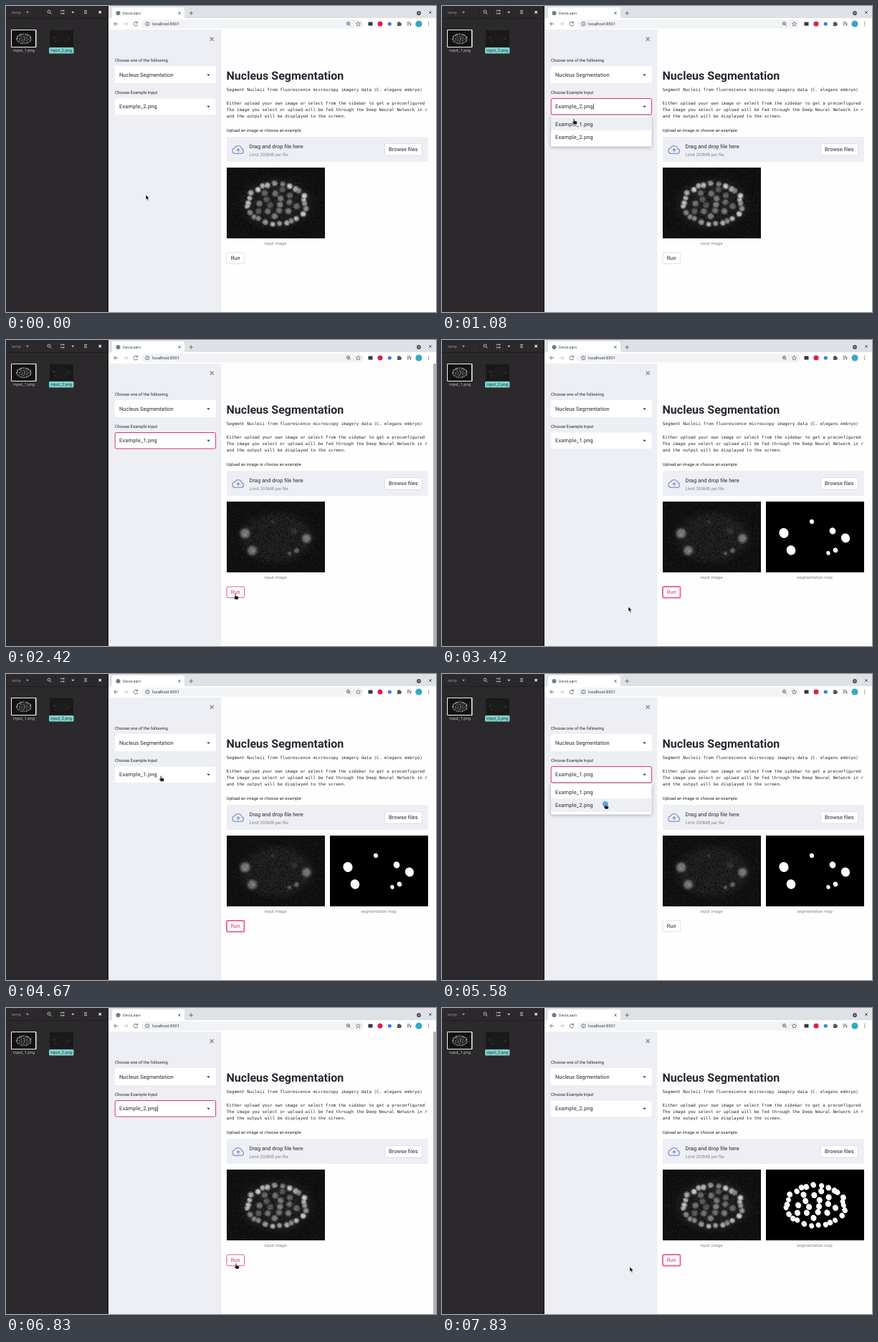
Recreate the animation shown at these times as an HTML page with a canvas. Size 600x428 px, loop 8000 ms.

```html
<!DOCTYPE html>
<html lang="en">
<head>
<meta charset="utf-8">
<title>Nucleus Segmentation</title>
<style>
html, body { margin: 0; width: 100%; height: 100%; overflow: hidden; background: #fefefe; }
#stage { position: relative; width: 600px; height: 428px; overflow: hidden; }
#stage > * { position: absolute; left: 0; top: 0; }
#stage > .input, #stage > .map { left: 307.5px; top: 225.5px; width: 137.5px; height: 99.5px; }
#stage > .map { left: 451.5px; }
text { font-family: Roboto, sans-serif; font-size: 7.5px; fill: #262730; text-rendering: geometricPrecision; white-space: pre; }
.label { font-size: 5.95px; }
.file { letter-spacing: .17px; }
.mono text { font-family: "DejaVu Sans Mono", monospace; font-size: 5.9px; }
.cap { font-size: 5.95px; fill: #85868c; text-anchor: middle; }
.thumb { font-size: 5.75px; text-anchor: middle; }
.line { fill: none; stroke: #5f6368; stroke-width: .9; }
.pale { fill: none; stroke: #c9c9c9; stroke-width: .9; }
</style>
</head>
<body>
<div id="stage">
<svg id="base" width="600" height="428">
  <!-- file manager -->
  <rect width="143" height="428" fill="#2b292b"/>
  <rect x="141" width="2" height="428" fill="#222022"/>
  <path d="M0 17.5H143" stroke="#201e20"/>
  <text x="8" y="10.6" style="font-size:5.6px;fill:#8f8d8f">temp</text>
  <g fill="#a5a3a5"><path d="M28 7.8h4l-2 2.4z"/><path d="M91.3 7.8h4l-2 2.4z" fill="#d5d5d5"/></g>
  <path d="M38.5 2V16M51.5 2V16M69.5 2V16M87.5 2V16M100.5 2V16" stroke="#252325"/>
  <g class="pale">
    <circle cx="60" cy="8" r="2"/><path d="M61.5 9.5l2 2"/>
    <path d="M76 6.5h1.500m1 0h3M76 10.5h1.500m1 0h3" stroke-width="1.5"/>
    <path d="M109 6.5h4m-4 2h4m-4 2h4"/>
    <path d="M129.5 7l3.4 3.4m0-3.4l-3.4 3.4" stroke="#fff" stroke-width="1.1"/>
  </g>
  <rect x="7" y="33" width="35.5" height="25" rx="1" fill="#f2f2f2"/>
  <rect x="60" y="58" width="34.5" height="8.5" rx="1.5" fill="#7fd0cc"/>
  <text class="thumb" x="25" y="64" style="fill:#b9b7b9">input_1.png</text>
  <text class="thumb" x="77.2" y="64" style="fill:#234846">input_2.png</text>

  <!-- browser -->
  <rect x="143" width="457" height="18" fill="#dee1e6"/>
  <path d="M145 18q3 0 3-3V5q0-3 3-3h95q3 0 3 3v10q0 3 3 3z" fill="#fff"/>
  <rect x="143" y="17" width="457" height="16" fill="#fff"/>
  <circle cx="156.5" cy="10" r="3" fill="#777a80"/>
  <text x="163" y="12" style="font-size:5.3px;fill:#3c4043">DevoLearn</text>
  <g class="line">
    <path d="M240.3 8.3l3.4 3.4m0-3.4l-3.4 3.4M258.3 7.3v5.4m-2.7-2.7h5.4"/>
    <path d="M590.3 7.3l3.4 3.4m0-3.4l-3.4 3.4" stroke="#3c4043"/>
    <path d="M156.2 25h-5.4m2.6-2.7l-2.7 2.7 2.7 2.7"/>
    <path d="M164.3 25h5.4m-2.6-2.7l2.7 2.7-2.7 2.7" stroke="#b9bcc0"/>
    <path d="M183.2 23.3a2.8 2.8 0 1 0 .5 2.6M183.7 21.7v2.2h-2.2"/>
  </g>
  <rect x="189" y="19" width="310" height="12.5" rx="6.2" fill="#f1f3f4"/>
  <g class="line">
    <circle cx="197.3" cy="25" r="2.7" stroke-width=".8"/><path d="M197.3 24.6v2m0-3.4v.8" stroke-width=".8"/>
    <circle cx="477.5" cy="24.5" r="2.2"/><path d="M479.2 26.2l2 2M476.4 24.5h2.2m-1.1-1.1v2.2" stroke-width=".7"/>
    <path d="M491.5 21.9l.9 2.1 2.3.2-1.7 1.5.5 2.2-2-1.2-2 1.2.5-2.2-1.7-1.5 2.3-.2z" stroke-width=".7"/>
    <path d="M559.5 22.8h5m-5 2h5m-5 2h2.500m2.500 1.200v-3h1.500"/>
  </g>
  <text x="204" y="27.2" style="font-size:5.8px;fill:#3c4043">localhost:8501</text>
  <rect x="505.5" y="22.500" width="6" height="5" fill="#33363b"/>
  <circle cx="522" cy="25" r="3.5" fill="#dc1f4b"/>
  <circle cx="535.3" cy="25" r="2.6" fill="#3b7de0"/>
  <path d="M546 23h1.600a1 1 0 1 1 1.900 0h1.500v1.600a1 1 0 1 1 0 1.900V28h-5z" fill="#55585d"/>
  <circle cx="576" cy="25" r="4.6" fill="#35a9c4"/>
  <circle cx="576" cy="10" r="2.9" fill="#4a4d52"/><path d="M574.7 9.4h2.600l-1.300 1.500z" fill="#fff"/>
  <path d="M589.7 22.6v0m0 2.400v0m0 2.400v0" stroke="#5f6368" stroke-width="1.400" stroke-linecap="round"/>

  <!-- sidebar -->
  <rect x="143" y="33" width="157.5" height="395" fill="#eeeff4"/>
  <path d="M284.7 43.7l5 5m0-5l-5 5" stroke="#8a8c94" stroke-width="1.3"/>
  <text class="label" x="152" y="78">Choose one of the following</text>
  <text class="label" x="152" y="122.7">Choose Example Input</text>
  <rect x="152" y="84" width="141" height="24" rx="2" fill="#fff"/>
  <text x="158" y="98.8">Nucleus Segmentation</text>
  <rect id="select" x="152.2" y="129.500" width="140.400" height="22.500" rx="2" fill="#fff"/>
  <text id="value" class="file" x="158" y="143.3"></text>
  <path id="caret" d="M211.5 136.5v8.5" stroke="#262730" stroke-width=".7"/>
  <path d="M280.3 95.4h4.4l-2.2 2.3zM280.3 139.8h4.4l-2.2 2.3z" fill="#262730"/>

  <!-- main column -->
  <text x="307.5" y="103" style="font-size:16.05px;font-weight:700">Nucleus Segmentation</text>
  <g class="mono">
    <text x="307.8" y="119">Segment Nucleii from fluorescence microscopy imagery data (C. elegans embryo)</text>
    <text x="307.8" y="137.7">Either upload your own image or select from the sidebar to get a preconfigured</text>
    <text x="307.8" y="146.9">The image you select or upload will be fed through the Deep Neural Network in r</text>
    <text x="307.8" y="156.1">and the output will be displayed to the screen.</text>
  </g>
  <text class="label" x="307.8" y="176">Upload an image or choose an example</text>
  <rect x="308" y="183" width="281" height="35" rx="2" fill="#eeeff4"/>
  <g fill="none" stroke="#8798c9" stroke-width="1.3" stroke-linejoin="round">
    <path d="M319.5 206.3a3.9 3.9 0 0 1-.4-7.7a5.2 5.2 0 0 1 9.8 1a3.4 3.4 0 0 1-.6 6.7z"/>
    <path d="M324 204.5v-4.5m-2.2 2l2.2-2.2 2.2 2.2"/>
  </g>
  <text x="339.5" y="198.6">Drag and drop file here</text>
  <text x="339.5" y="209.6" style="font-size:6.1px;fill:#85868c">Limit 200MB per file</text>
  <rect x="528.5" y="192.5" width="52" height="16.5" rx="2" fill="#fff" stroke="#d8dae1" stroke-width=".8"/>
  <text x="534" y="203.3">Browse files</text>
  <text class="cap" x="376" y="334">input image</text>
  <text class="cap" id="mapCap" x="520" y="334">segmentation map</text>
  <rect id="run" x="308" y="345" width="24.5" height="15.5" rx="2" fill="#fff"/>
  <text id="runText" x="313.7" y="355.4">Run</text>
  <rect id="scrollbar" x="596" y="33" width="4" height="395" fill="#b4b4b6"/>
</svg>

<svg id="top" width="600" height="428">
  <g id="menu">
    <rect x="152" y="153" width="140.5" height="43.5" rx="2" fill="#fff" style="filter:drop-shadow(0 1.5px 2.5px rgba(0,0,0,.3))"/>
    <rect id="hover" x="152" width="140.5" height="18.5" fill="#eeeff4"/>
    <text class="file" x="158" y="167.5">Example_1.png</text>
    <text class="file" x="158" y="186.2">Example_2.png</text>
  </g>
  <g id="cursor">
    <circle id="click" cy="1" r="4" fill="#5aa9e6"/>
    <g fill="#111" stroke="#fff" stroke-width=".5">
      <path id="arrow" d="M0 0v7l1.600-1.400 1.200 2.600 1.300-.6-1.200-2.500h2.200z"/>
      <path id="hand" d="M-.8.6q.8-1.2 1.600 0v2.300l3 .8q.9.300.7 1.300l-.6 3H-.2l-2.200-3q-.2-1 .6-.9l1 .8z"/>
    </g>
  </g>
</svg>
</div>

<script>
const W = 137, H = 99, LOOP = 8000, STEP = 1000 / 12, GLIDE = 620;
const $ = id => document.getElementById(id);
const stage = $('stage');

function seeded(s) {
  return () => (s = (s * 16807) % 2147483647) / 2147483647;
}

// Late embryo: a jittered ring of nuclei around a sunflower-packed core
function lateCells() {
  const rnd = seeded(77), cells = [];
  const add = (angle, reach, r, b) => cells.push({
    x: 69 + 43 * reach * Math.cos(angle), y: 50 + 29 * reach * Math.sin(angle), r, b
  });
  for (let i = 0; i < 26; i++) {
    add((i + .5 * rnd()) / 26 * 2 * Math.PI, .9 + .1 * rnd(), 3.3 + .6 * rnd(), 95 + 75 * rnd());
  }
  for (let i = 0; i < 16; i++) add(i * 2.4 + .4, .72 * Math.sqrt((i + .5) / 16), 4, 60 + 45 * rnd());
  return cells;
}

// Early embryo: x, y, radius, brightness
const earlyCells = [[25, 44, 6.5, 95], [111, 51, 6, 90], [35, 68, 6.2, 90], [93, 41, 4.3, 22],
  [64, 28, 3, 18], [97, 68, 3.2, 70], [87, 72, 2.6, 55]].map(([x, y, r, b]) => ({ x, y, r, b }));

function makeCanvas(cls, w = W, h = H) {
  const c = document.createElement('canvas');
  c.width = w; c.height = h; c.className = cls;
  stage.insertBefore(c, $('top'));
  return c;
}

// Fluorescence picture: soft nuclei in a hazy, grainy embryo
function micrograph(cells) {
  const c = makeCanvas('input'), g = c.getContext('2d');
  const img = g.createImageData(W, H), rnd = seeded(29);
  for (let y = 0, p = 0; y < H; y++) for (let x = 0; x < W; x++, p += 4) {
    const body = Math.hypot((x - 69) / 50, (y - 50) / 35);
    let glow = 0;
    for (const n of cells) {
      const d = Math.hypot(x - n.x, y - n.y) / n.r;
      if (d < 2) glow = Math.max(glow, n.b * Math.exp(-(d ** 4) * .7));
    }
    const haze = 16 + 13 * Math.min(1, Math.max(0, (1.15 - body) * 3));
    const v = haze * (.5 + rnd()) + glow * (.8 + .4 * rnd());
    img.data.set([v, v, v, 255], p);
  }
  g.putImageData(img, 0, 0);
  return c;
}

function mask(cells) {
  const c = makeCanvas('map'), g = c.getContext('2d');
  g.fillRect(0, 0, W, H);
  g.fillStyle = '#fff';
  for (const { x, y, r } of cells) {
    g.beginPath();
    g.ellipse(x, y, r, r * 1.1, -.4, 0, 7);
    g.fill();
  }
  return c;
}

function thumb(src, x, alpha) {
  const c = makeCanvas('', 33, 23), g = c.getContext('2d');
  c.style.cssText = `left:${x}px;top:34px`;
  g.fillStyle = '#1d1c1d';
  g.fillRect(0, 0, 33, 23);
  g.globalAlpha = alpha;
  g.drawImage(src, 0, 0, 33, 23);
}

const samples = [earlyCells, lateCells()];
const inputs = samples.map(micrograph);
const maps = samples.map(mask);
thumb(inputs[1], 8, .85);
thumb(inputs[0], 61, .2);

// Each round picks one example, then runs it
const rounds = [
  { open: 750, pick: 1330, swap: 1830, run: 2580, map: 3325 },
  { open: 4750, pick: 5660, swap: 5910, run: 6910, map: 7575 }
];

// Pointer stops: arrival time, x, y
const stops = [[0, 195, 264], [740, 204, 142], [1000, 184, 157], [1670, 196, 229], [2370, 320, 355],
  [3170, 260, 373], [4680, 216, 142], [5080, 222, 165], [5500, 228, 181], [6780, 321, 357], [7790, 262, 362]];

function pointer(t) {
  const next = stops.findIndex(s => s[0] > t);
  const i = next < 0 ? stops.length - 1 : next;
  const [t0, x0, y0] = stops[i - 1], [t1, x1, y1] = stops[i];
  const from = Math.max(t0, t1 - GLIDE);
  const u = Math.min(1, Math.max(0, (t - from) / (t1 - from))), e = u * u * (3 - 2 * u);
  return [x0 + (x1 - x0) * e, y0 + (y1 - y0) * e];
}

const show = (el, on) => { el.style.visibility = on ? 'visible' : 'hidden'; };
const inside = (x, y, l, t, r, b) => x >= l && x <= r && y >= t && y <= b;

function outline(el, color, width) {
  el.setAttribute('stroke', color);
  el.setAttribute('stroke-width', width);
}

function render(t) {
  const [x, y] = pointer(t);
  const k = t < rounds[1].open ? 0 : 1, now = rounds[k];
  const open = t >= now.open && t < now.pick;
  const focus = t >= now.open && t < now.run;
  const ran = t >= now.run;
  const shown = t >= now.swap ? k : 1 - k;
  const mapped = t >= now.map ? k : k === 1 && t < now.swap ? 0 : -1;
  const overRun = inside(x, y, 308, 345, 333, 361);
  const hand = overRun || inside(x, y, 152, 129, 293, open ? 196 : 152);

  $('value').textContent = `Example_${(t >= now.pick ? k : 1 - k) + 1}.png`;
  outline($('select'), focus ? '#d9336b' : 'none', 1);
  show($('caret'), focus && (t - now.open) % 1000 < 500);

  show($('menu'), open);
  show($('hover'), open && y > 155);
  $('hover').setAttribute('y', y < 174.3 ? 155.5 : 174.2);

  inputs.forEach((c, i) => show(c, i === shown));
  maps.forEach((c, i) => show(c, i === mapped));
  show($('mapCap'), mapped >= 0);

  outline($('run'), ran ? '#f0689b' : overRun ? '#e0346c' : '#d8dae1', ran ? 2 : .8);
  $('runText').style.fill = ran || overRun ? '#e0346c' : '#262730';
  show($('scrollbar'), x > 300);

  $('cursor').setAttribute('transform', `translate(${x.toFixed(1)} ${y.toFixed(1)})`);
  show($('hand'), hand);
  show($('arrow'), !hand);
  show($('click'), open && k === 1 && t > now.pick - 170);
}

const start = performance.now();
function frame() {
  const t = (performance.now() - start) % LOOP;
  render(Math.floor((t + 4) / STEP) * STEP % LOOP);
  requestAnimationFrame(frame);
}
render(0);
requestAnimationFrame(frame);
</script>
</body>
</html>
```
